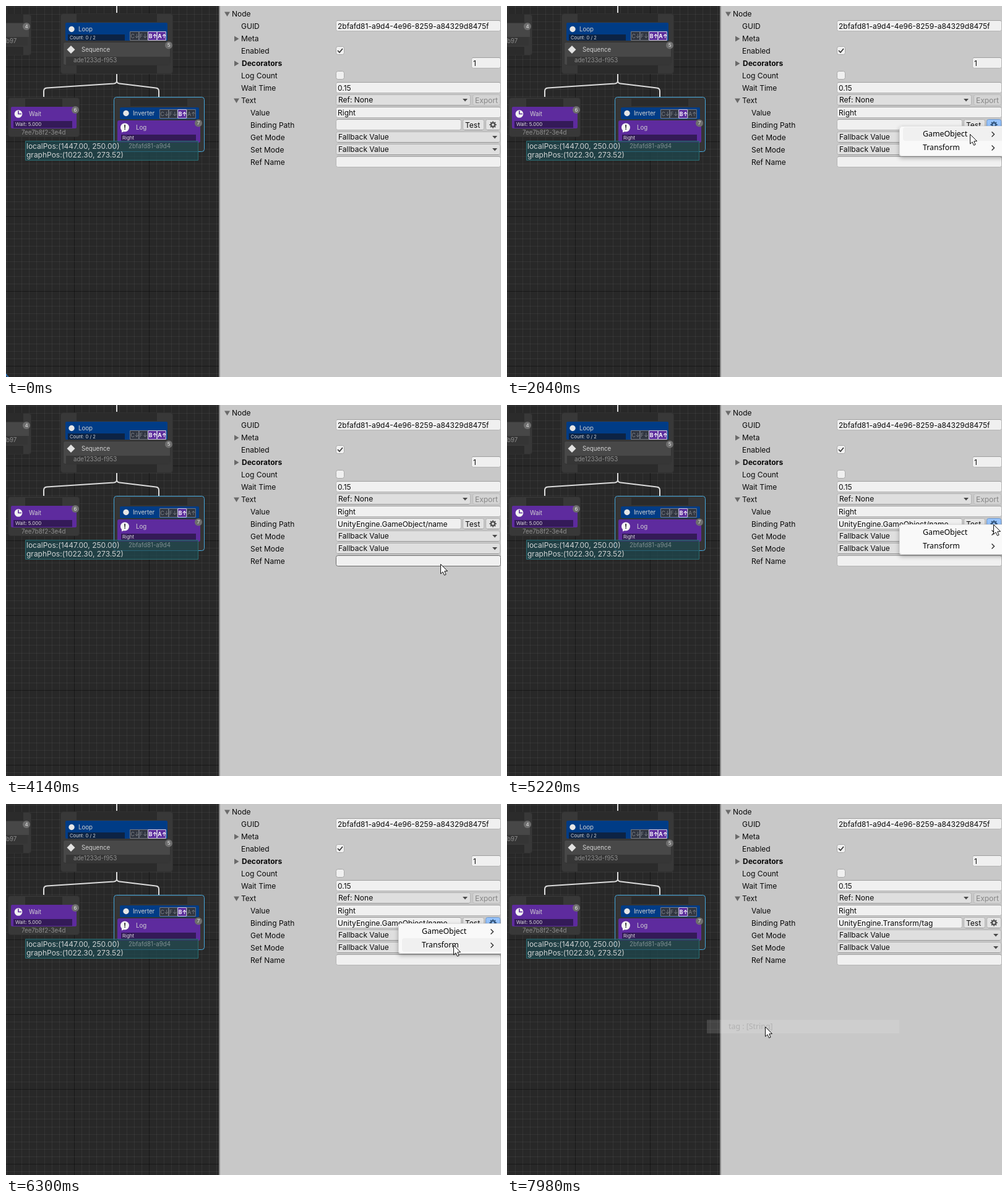
An HTML page with a canvas for the animation above (8 s loop, 800 px wide and 600 px high).

```html
<!DOCTYPE html>
<html>
<head>
<meta charset="utf-8">
<style>
html, body { margin: 0; width: 100%; height: 100%; overflow: hidden; background: #c8c8c8; }
canvas { display: block; }
</style>
</head>
<body>
<canvas id="stage" width="800" height="600"></canvas>
<script>
const c = document.getElementById('stage').getContext('2d');
const LOOP = 8000, STEP = 60;
const UI = 'Inter, "Liberation Sans", sans-serif';
const MENU = '"Noto Sans", "Open Sans", sans-serif';

// y is the middle of the capitals
function text(s, x, y, size = 12, color = '#090909', font = UI, weight = 400) {
  c.font = `${weight} ${size}px ${font}`;
  c.fillStyle = color;
  c.fillText(s, x, Math.round(y + size * .36));
}

function box(x, y, w, h, fill, stroke, r = 0) {
  c.beginPath();
  if (stroke) c.roundRect(x + .5, y + .5, w - 1, h - 1, r);
  else c.roundRect(x, y, w, h, r);
  if (fill) { c.fillStyle = fill; c.fill(); }
  if (stroke) { c.strokeStyle = stroke; c.lineWidth = 1; c.stroke(); }
}

function dot(x, y, r, fill) {
  c.beginPath();
  c.arc(x, y, r, 0, 7);
  c.fillStyle = fill;
  c.fill();
}

function poly(points, fill) {
  c.beginPath();
  points.forEach(([x, y]) => c.lineTo(x, y));
  c.closePath();
  c.fillStyle = fill;
  c.fill();
}

function line(points, color, width) {
  c.beginPath();
  points.forEach(([x, y]) => c.lineTo(x, y));
  c.strokeStyle = color;
  c.lineWidth = width;
  c.stroke();
}

const ramp = (t, from, to) => Math.max(0, Math.min(1, (t - from) / (to - from)));

// ---- graph ----
function grid() {
  box(0, 0, 344, 600, '#282828');
  const gap = 12.1;
  for (let i = -28; i < 22; i++) {
    const major = i % 10 === 0;
    c.fillStyle = major ? 'rgba(0,0,0,.4)' : 'rgba(193,196,192,.075)';
    c.fillRect(0, Math.round(340 + i * gap), 344, 1);
    if (i < 20) c.fillRect(Math.round(110 + (i + 18) * gap - 18 * gap), 0, 1, 600);
  }
}

function badge(n, x, y) {
  dot(x, y, 6, '#6e6e6e');
  c.textAlign = 'center';
  text(n, x, y, 8, '#e6e6e6');
  c.textAlign = 'left';
}

function flags(x, y, on) {
  ['C↓', 'F↓', 'B↑', 'A↑'].forEach((s, i) => {
    const active = on.includes(s[0]);
    box(x + i * 14.6, y, 15, 15, active ? '#5c2d9c' : '#303540', active ? '#d8d0e4' : '#777b84');
    text(s, x + 1.5 + i * 14.6, y + 7.5, 8.6, active ? '#fff' : '#82868c', UI, active ? 700 : 400);
  });
}

function edge(dir, x) {
  c.beginPath();
  c.moveTo(179, 110);
  c.lineTo(179, 121);
  c.quadraticCurveTo(179, 125, 179 + dir * 5, 125.6);
  c.lineTo(x - dir * 5, 132.6);
  c.quadraticCurveTo(x, 133, x, 138);
  c.lineTo(x, 147);
  c.strokeStyle = '#dcdcdc';
  c.lineWidth = 2;
  c.stroke();
}

const BLUE = '#003c86', PURPLE = '#5e2b9e', LIGHT = '#d2d2d2', DIM = '#8f8f8f';

function graph(focused) {
  grid();
  // clipped neighbour
  box(-20, 13, 61, 67, '#383838', '#303030', 4);
  box(-20, 13, 48, 14, '#2b2b2b');
  box(-20, 28, 57, 22, '#474747');
  box(-20, 50, 55, 14, '#353535');
  box(-20, 66, 48, 13, '#2b2b2b');
  text('b97', 0, 57, 9.7, DIM);
  badge('4', 33, 33);

  // loop + sequence
  line([[179, 0], [179, 11]], '#dcdcdc', 2);
  box(88, 12, 182, 98, '#383838', '#303030', 4);
  box(114, 13, 130, 13, '#2b2b2b');
  box(114, 96, 130, 13, '#2b2b2b');
  box(96, 27, 165, 29, BLUE, 0, 2);
  dot(106, 37.5, 4.7, '#e6e6e6');
  text('Loop', 117, 37.5, 9.7, LIGHT);
  box(100, 46, 92, 10, '#0c2344');
  text('Count: 0 / 2', 103, 51, 7.5, '#dcdcdc');
  flags(200, 41, 'BA');
  box(92, 58, 174, 38, '#484848', '#333', 3);
  box(97, 82, 168, 13, '#363636');
  poly([[105, 64], [111.5, 70.5], [105, 77], [98.5, 70.5]], '#e2e2e2');
  text('Sequence', 122, 71, 9.7, LIGHT);
  text('ade1233d-f953', 109, 88, 9.7, DIM);
  badge('5', 263, 63.5);
  edge(-1, 61);
  edge(1, 247);

  // wait
  box(3, 148, 116, 64, '#383838', '#303030', 4);
  box(31, 150, 60, 13, '#2b2b2b');
  box(8, 163, 106, 35, PURPLE, 0, 2);
  dot(20, 174.5, 6.3, '#f2f2f2');
  line([[20, 169.5], [20, 174.5], [25, 174.5]], PURPLE, 1.6);
  text('Wait', 37, 174.5, 9.7, LIGHT);
  box(12, 186, 95, 11, '#341a58');
  text('Wait: 5.000', 15, 191, 7.9, '#dcdcdc');
  text('7ee7b8f2-3e4d', 25, 205, 9.7, DIM);
  badge('6', 112, 168);

  // inverter + log
  box(174, 147, 147, 89, '#353535', '#46a9dd', 4);
  box(201, 150, 92, 12, '#2a2a2a');
  box(184, 164, 128, 19, BLUE, 0, 2);
  dot(194, 173.5, 4.7, '#e6e6e6');
  text('Inverter', 205, 174, 9.7, LIGHT);
  flags(248, 167, 'B');
  box(180, 185, 134, 36, PURPLE, 0, 3);
  dot(192, 196.5, 7, '#f4f4f4');
  poly([[187, 200], [187, 204.5], [193, 202]], '#f4f4f4');
  text('!', 190.2, 196.5, 11, '#222', UI, 700);
  text('Log', 210, 197, 9.7, LIGHT);
  box(186, 208, 121, 11, '#341a58');
  text('Right', 188, 213, 7.9, '#dcdcdc');
  badge('7', 311, 189.5);

  // position readout
  box(31, 218, 280, 32, 'rgba(30,72,80,.72)', '#2b6d73');
  text('localPos:(1447.00, 250.00)', 33, 227, 12, '#cfd2d2');
  text('graphPos:(1022.30, 273.52)', 33, 241, 12, '#cfd2d2');
  text('2bfafd81-a9d4', 198, 226.5, 9.7, '#7f8f92');

  if (focused) line([[.5, 595], [1, 598], [4, 599.5]], '#2f7fd0', 1.5);
  box(344, 0, 2, 600, '#8a8a8a');
}

// ---- inspector ----
function fold(x, y, open) {
  poly(open ? [[x - 4.5, y - 3.5], [x + 4.5, y - 3.5], [x, y + 4]]
            : [[x - 3.5, y - 4.5], [x + 4, y], [x - 3.5, y + 4.5]], '#6a6a6a');
}

function field(x, y, w, s, cursor) {
  const hover = cursor && cursor[0] >= x && cursor[0] < x + w && Math.abs(cursor[1] - y) < 9;
  box(x, y - 9, w, 18, '#f0f0f0', hover ? '#6c6c6c' : '#b5b5b5', 3);
  if (!hover) line([[x + 2, y - 8.5], [x + w - 2, y - 8.5]], '#a0a0a0', 1);
  c.save();
  c.beginPath();
  c.rect(x, y - 9, w - 2, 18);
  c.clip();
  text(s, x + 3, y + .5);
  c.restore();
}

function button(x, y, w, fill, stroke) {
  box(x, y - 9, w, 18, fill, stroke, 3);
  line([[x + 3, y + 8.5], [x + w - 3, y + 8.5]], '#979797', 1);
}

function dropdown(y, w, s) {
  button(533, y, w, '#dfdfdf', '#b2b2b2');
  text(s, 537, y);
  const x = 533 + w - 9;
  poly([[x - 4, y - 2], [x + 4, y - 2], [x, y + 2.5]], '#4a4a4a');
}

function checkbox(y, on) {
  box(533, y - 7, 14, 14, '#f0f0f0', '#a9a9a9', 3);
  if (on) line([[536, y], [539, y + 3], [544, y - 3]], '#333', 1.7);
}

function gear(on) {
  button(775, 192, 24, on ? '#96c3fb' : '#e4e4e4', on ? '#6f98cc' : '#b2b2b2');
  const color = on ? '#35587f' : '#505050';
  for (let i = 0; i < 8; i++) {
    const a = i * Math.PI / 4, dx = Math.cos(a), dy = Math.sin(a);
    line([[787 + dx * 3, 192 + dy * 3], [787 + dx * 5.6, 192 + dy * 5.6]], color, 2);
  }
  c.beginPath();
  c.arc(787, 192, 3, 0, 7);
  c.strokeStyle = color;
  c.lineWidth = 2.2;
  c.stroke();
}

function inspector(path, pressed, cursor) {
  box(346, 0, 454, 600, '#c8c8c8');
  fold(357.5, 13, true);
  text('Node', 365, 13);
  fold(372.5, 53, false);
  fold(372.5, 93, false);
  fold(372.5, 153, true);
  ['GUID', 'Meta', 'Enabled', 'Decorators', 'Log Count', 'Wait Time', 'Text'].forEach((s, i) =>
    text(s, s === 'Decorators' ? 381 : 380, 33 + i * 20, 12, '#090909', UI, s === 'Decorators' ? 700 : 400));
  ['Value', 'Binding Path', 'Get Mode', 'Set Mode', 'Ref Name'].forEach((s, i) =>
    text(s, 395, 173 + i * 20));

  field(533, 32, 267, '2bfafd81-a9d4-4e96-8259-a84329d8475f', cursor);
  checkbox(72, true);
  field(752, 92, 48, '1', cursor);
  checkbox(112, false);
  field(533, 132, 267, '0.15', cursor);
  dropdown(152, 218, 'Ref: None');
  box(754, 143, 45, 18, '#d4d4d4', '#bcbcbc', 3);
  text('Export', 758, 152.5, 12, '#868686');
  field(533, 172, 267, 'Right', cursor);
  field(533, 192, 203, path, cursor);
  button(738, 192, 35, '#e4e4e4', '#b2b2b2');
  text('Test', 742, 192.5);
  gear(pressed);
  dropdown(212, 266, 'Fallback Value');
  dropdown(232, 266, 'Fallback Value');
  field(533, 252, 267, '', cursor);
}

// ---- menus ----
const OBJECT = ['active : [Boolean]', 'activeInHierarchy : [Boolean]', 'activeSelf : [Boolean]',
  'isStatic : [Boolean]', 'isStaticBatchable : [Boolean]', 'layer : [Int32]', 'name : [String]',
  'sceneCullingMask : [UInt64]', 'tag : [String]'];
const TRANSFORM = ['childCount : [Int32]', 'constrainProportionsScale : [Boolean]', 'hasChanged : [Boolean]',
  'hierarchyCapacity : [Int32]', 'hierarchyCount : [Int32]', 'name : [String]', 'tag : [String]'];
const ROW = 22;

// first is the middle of the first row
function menu(items, x, first, w, active, alpha, arrows) {
  if (alpha <= 0) return;
  c.save();
  c.globalAlpha = alpha;
  c.shadowColor = 'rgba(0,0,0,.3)';
  c.shadowBlur = 7;
  c.shadowOffsetY = 3;
  box(x, first - 13, w, items.length * ROW + 5, '#f9f9f9', 0, 4);
  c.shadowColor = 'transparent';
  box(x, first - 13, w, items.length * ROW + 5, 0, 'rgba(0,0,0,.1)', 4);
  items.forEach((s, i) => {
    const y = first + i * ROW;
    if (i === active) box(x + 6, y - 11, w - 12, ROW, '#f0f0f0', 0, 4);
    text(s, x + 38, y, 12.35, '#000', MENU);
    if (arrows) line([[783.5, y - 3.5], [787.5, y + .5], [783.5, y + 4.5]], '#222', 1.3);
  });
  c.restore();
}

function submenu(items, x, first, [cx, cy], alpha) {
  const row = cx < 637 ? Math.floor((cy - first + 11) / ROW) : -1;
  menu(items, x, first, 637 - x, row, alpha);
}

function chosen(s, x, y, age) {
  if (age < 0 || age > 280) return;
  c.globalAlpha = 1 - age / 280;
  box(x + 3, y - 11, 631 - x, ROW, '#f0f0f0');
  text(s, x + 38, y, 12.35, '#000', MENU);
  c.globalAlpha = 1;
}

function menus(t, cursor) {
  if (t < 3540) {
    menu(['GameObject', 'Transform'], 634, 207, 180, 0, ramp(t, 1440, 1620), true);
    submenu(OBJECT, 373, 207, cursor, ramp(t, 2160, 2340));
  } else if (t < 7740) {
    const active = t < 5400 ? -1 : t < 6060 ? 0 : 1;
    menu(['GameObject', 'Transform'], 634, 206, 180, active, ramp(t, 5040, 5220), true);
    if (t < 6300) submenu(OBJECT, 373, 206, cursor, ramp(t, 5760, 5940));
    else submenu(TRANSFORM, 320, 228, cursor, ramp(t, 6300, 6480));
  }
  chosen('name : [String]', 373, 339, t - 3540);
  chosen('tag : [String]', 320, 360, t - 7740);
}

// ---- pointer ----
const PATH = [[180, 795, 60], [420, 790, 130], [660, 781, 216], [960, 778, 193], [1020, 783, 194],
  [1800, 783, 194], [2040, 748, 207], [2340, 748, 207], [2580, 630, 213], [3000, 493, 331],
  [3180, 480, 334], [3720, 480, 334], [4080, 680, 270], [4320, 769, 217], [4560, 787, 187],
  [4680, 786, 193], [5340, 786, 193], [5640, 735, 206], [5940, 735, 206], [6120, 723, 228],
  [6420, 723, 228], [6600, 630, 232], [6900, 450, 330], [7080, 417, 349], [7320, 417, 360], [8000, 417, 360]];

function pointerAt(t) {
  if (t < PATH[0][0]) return null;
  const i = PATH.findIndex(p => p[0] > t);
  const [t0, x0, y0] = PATH[i - 1], [t1, x1, y1] = PATH[i], k = (t - t0) / (t1 - t0);
  return [Math.round(x0 + (x1 - x0) * k), Math.round(y0 + (y1 - y0) * k)];
}

function pointer([x, y]) {
  c.beginPath();
  [[0, 0], [0, 15.5], [3.5, 12.3], [6, 17.8], [8.6, 16.6], [6.2, 11.3], [11, 11]]
    .forEach(([dx, dy]) => c.lineTo(x + .5 + dx, y + .5 + dy));
  c.closePath();
  c.fillStyle = '#fff';
  c.fill();
  c.strokeStyle = '#111';
  c.lineWidth = 1;
  c.stroke();
}

function draw(now) {
  const t = Math.floor(now % LOOP / STEP) * STEP;
  const cursor = pointerAt(t);
  const path = t < 3540 ? '' : t < 7740 ? 'UnityEngine.GameObject/name' : 'UnityEngine.Transform/tag';
  const pressed = t >= 1320 && t < 3540 || t >= 4980 && t < 7740;
  graph(t < 1320);
  inspector(path, pressed, pressed ? null : cursor);
  if (cursor) {
    menus(t, cursor);
    pointer(cursor);
  }
}

const start = performance.now();
(function tick() {
  draw(performance.now() - start);
  requestAnimationFrame(tick);
})();
</script>
</body>
</html>
```
